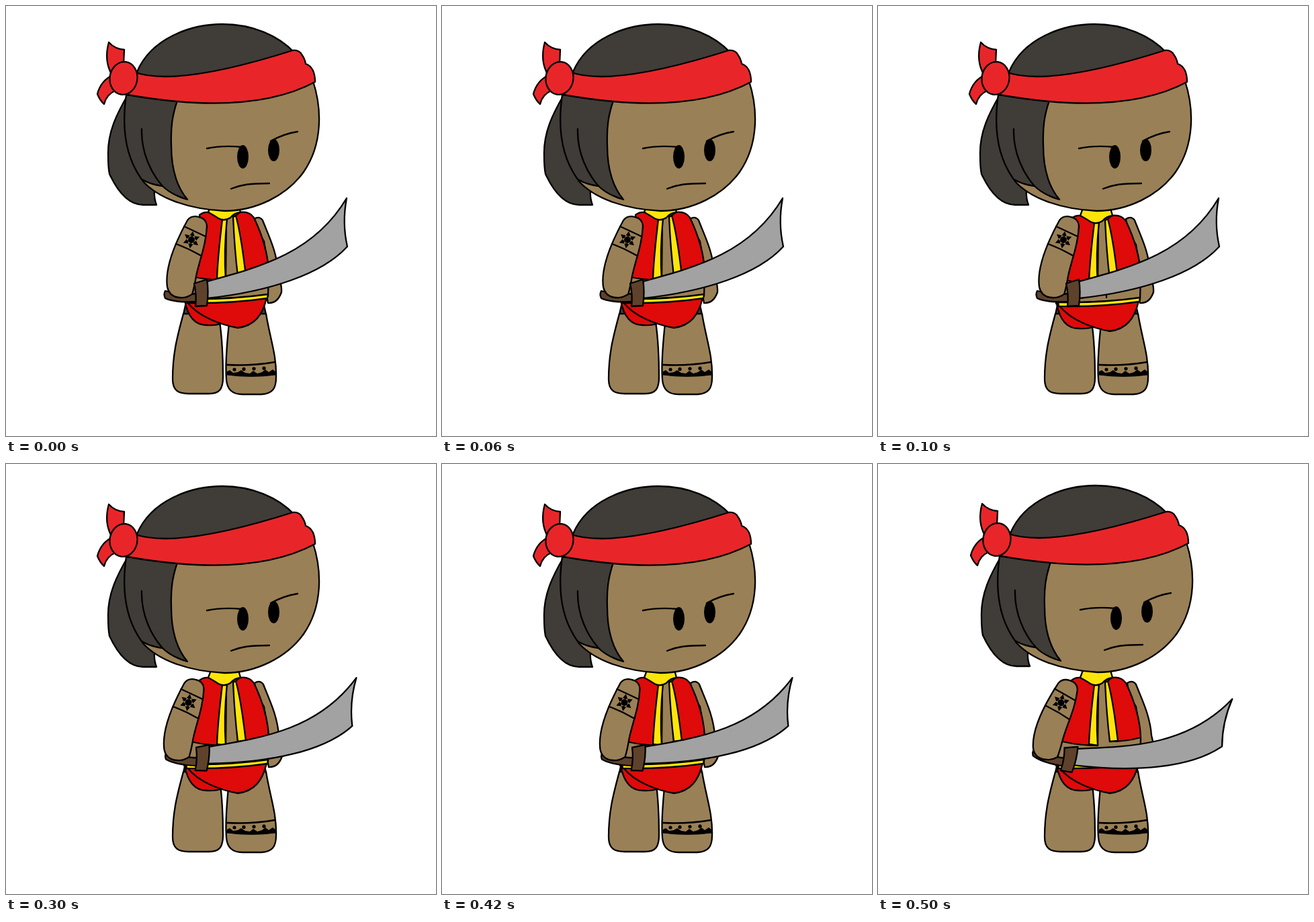
Animation, 640 px wide and 640 px high, one loop 600 ms. Source, as an HTML page:

```html
<!DOCTYPE html>
<html lang="en">
<head>
<meta charset="utf-8">
<title>Sword bearer idle</title>
<style>
  html, body { margin: 0; width: 100%; height: 100%; overflow: hidden; background: #fff; }
  svg { display: block; width: 100vw; height: 100vh; }
  .skin { fill: #9a8056; }
  .hair { fill: #403c37; }
  .band { fill: #e82629; }
  .red { fill: #df0a0a; }
  .gold { fill: #ffe40a; }
  .steel { fill: #a2a2a2; }
  .wood { fill: #5f422c; }
  .ink { fill: #000; stroke: none; }
  .line { fill: none; }
</style>
</head>
<body>
<svg viewBox="0 0 640 640" stroke="#000" stroke-width="2.3" stroke-linejoin="round" stroke-linecap="round">
  <g id="legs">
    <path class="hair" d="M268 441L264 459H387L383 441Z"/>
    <path class="skin" d="M264 458C256 488 248 515 248 555C248 572 256 577 272 577H302C318 577 323 570 323 552Q323 505 318 470L274 458Z"/>
    <path class="skin" d="M332 472C329 500 326 530 328 556C329 572 338 578 352 578H380C396 577 402 570 402 553C403 520 393 495 387 458H378Z"/>
    <path class="line" d="M328 534Q365 536 400 530M328 548Q365 553 402 548"/>
    <path class="ink" d="M329 544L333 542L338 546L345 545L350 542L356 546L363 547L368 543L374 547L381 545L386 541L391 545L397 541L402 545V549Q365 554 329 549Z"/>
    <g id="dots" class="ink"></g>
  </g>

  <g id="backArm">
    <path class="skin" d="M369 317Q377 312 382 319C390 340 403 365 405 395C408 408 411 418 410 426Q404 443 390 442L378 380Z"/>
  </g>

  <g id="torso">
    <path class="skin" d="M295 309L357 308L384 350L391 397L390 432L265 438L272 402Z"/>
    <path class="line" d="M340 422V429"/>
    <path class="red" d="M302 307Q294 306 288 311C292 336 284 372 274 402Q300 408 327 408L328 317Z"/>
    <path class="red" d="M340 314L348 307Q362 305 369 315C380 338 390 367 391 396Q370 402 345 402Z"/>
    <path class="gold" d="M322 317C318 350 315 380 314 406L327 408C325 380 326 345 329 316Z"/>
    <path class="gold" d="M338 314Q340 360 345 402L357 401C353 370 350 340 342 312Z"/>
    <path class="gold" d="M305 296L301 307Q312 313 316 316Q325 321 334 315Q340 308 349 307L346 296Z"/>
    <path class="red" d="M266 438C270 460 280 475 299 475Q312 476 322 472L345 440Z"/>
    <path class="red" d="M270 441C286 462 318 474 345 479C370 476 382 460 388 434Z"/>
    <path class="gold" d="M268 436Q335 437 390 429L389 435Q335 443 269 442Z"/>
  </g>

  <g class="sword">
    <path class="wood" d="M284 428C265 430 250 427 237 424Q234 429 237 435Q252 442 284 440Z"/>
    <path class="steel" d="M299 410C380 388 459 367 507 286Q500 323 508 358C470 400 390 425 300 435Z"/>
  </g>

  <g id="frontArm">
    <path class="skin" d="M270 319Q276 311 287 314Q298 316 299 327C298 355 288 378 283 402Q280 420 277 429Q268 435 259 434Q243 433 240 418C236 390 252 352 270 319Z"/>
    <path class="line" d="M265 328Q278 334 297 343M253 354Q272 361 291 372"/>
    <g id="sun" class="ink" transform="translate(276 348)"><circle r="5"/></g>
  </g>

  <g class="sword">
    <path class="wood" d="M280 413L299 407Q302 425 299 446L282 447Q284 430 280 413Z"/>
  </g>

  <g id="head">
    <path class="hair" d="M182 131C165 160 151 188 152 222Q152 240 154 250C168 280 184 296 204 296H224Q220 286 221 274L245 200Z"/>
    <path class="skin" d="M457 112C470 152 472 205 443 247C418 282 372 305 325 305C270 302 226 286 203 260L245 140Z"/>
    <path class="hair" d="M195 98C216 48 275 27 322 27C367 27 405 44 429 69L330 125L205 120Z"/>
    <path class="hair" d="M179 132C172 180 178 225 202 258Q216 266 233 268Q246 281 270 288C255 270 246 245 246 208C245 182 247 163 256 138Z"/>
    <path class="line" d="M202 183C201 218 216 249 233 268"/>
    <path class="band" d="M190 98C235 115 320 100 427 66Q436 65 440 72Q445 79 446 86Q460 91 460 113C380 156 265 147 180 132Z"/>
    <path class="band" d="M153 54Q162 64 176 65L175 86L158 103C149 88 148 72 153 54Z"/>
    <path class="band" d="M160 102Q141 111 136 131Q140 141 146 146Q150 131 163 126Z"/>
    <ellipse class="band" cx="175" cy="107.500" rx="20.500" ry="24.500" transform="rotate(8 175 107)"/>
    <g class="ink">
      <ellipse cx="352.500" cy="224.500" rx="8.500" ry="17.500"/>
      <ellipse cx="398.500" cy="214.500" rx="8.500" ry="16.500"/>
    </g>
    <path class="line" d="M299 212Q323 207 352 210M394 201Q414 190 434 187M335 272C350 266 362 264 392 264"/>
  </g>
</svg>
<script>
const $ = id => document.getElementById(id);
const swords = document.querySelectorAll(".sword");

$("dots").innerHTML = [340, 354, 369, 384]
  .map((x, i) => `<circle cx="${x}" cy="${541 - i * 0.6}" r="2.6"/>`).join("");
for (let i = 0; i < 6; i++)
  $("sun").innerHTML += `<path d="M-3.500 -6.500L0 -13L3.500 -6.500L0 -5Z" transform="rotate(${i * 60 + 10})"/>`;

// Each part: [dx, dy, turn in degrees]
const poses = [
  { from: 0,   head: [0, 0], torso: [0, 0],  back: [0, 0], arm: [0, 0, 0],    sword: [0, 0, 0] },
  { from: 100, head: [0, 0], torso: [0, 5],  back: [0, 0], arm: [0, 0, 0],    sword: [0, 0, 0] },
  { from: 300, head: [0, 6], torso: [0, 11], back: [1, 9], arm: [-4.5, 7, 0], sword: [2, 11, 5.7] },
  { from: 500, head: [2, 5], torso: [0, 11], back: [2, 9], arm: [-1, 8, 4.5], sword: [-5, 14, 13] }
];

function place(el, [dx, dy, turn = 0], px = 0, py = 0) {
  el.setAttribute("transform", `translate(${dx} ${dy}) rotate(${turn} ${px} ${py})`);
}

function draw() {
  const t = performance.now() % 600;
  const pose = poses.findLast(p => t >= p.from);
  place($("head"), pose.head);
  place($("torso"), pose.torso);
  place($("backArm"), pose.back);
  place($("frontArm"), pose.arm, 283, 313);
  swords.forEach(s => place(s, pose.sword, 301, 422));
  requestAnimationFrame(draw);
}
draw();
</script>
</body>
</html>
```
